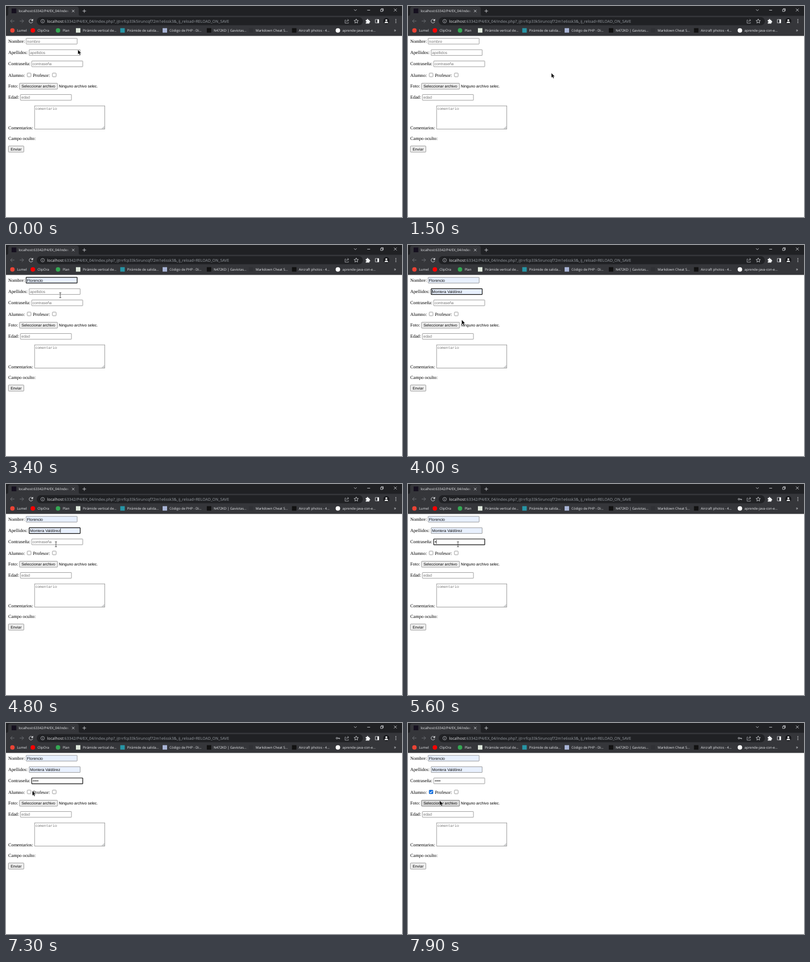
Recreate the animation shown at these times as an HTML page. Size 708x378 px, loop 8 s.

```html
<!DOCTYPE html>
<html lang="es">
<head>
<meta charset="utf-8">
<title>Formulario</title>
<style>
  html, body { margin: 0; width: 100%; height: 100%; overflow: hidden; background: #fff; }
  svg { display: block; text-rendering: geometricPrecision; white-space: pre; }
  .ui { font: 6.06px "Open Sans", sans-serif; fill: #e8eaed; }
  .url { font: 6.98px "Open Sans", sans-serif; fill: #9aa0a6; }
  .label { font: 8.29px "Liberation Serif", serif; fill: #000; }
  .control { font: 6.9px "Liberation Sans", sans-serif; fill: #000; }
  .hint { fill: #757575; }
  .mono { font: 6.45px "Liberation Mono", monospace; fill: #757575; }
  .icon { fill: none; stroke: #dfe1e5; stroke-width: .8; }
  .dim { stroke: #797c80; }
  .soft { stroke: #b4b7bb; }
  .solid { fill: #f1f3f4; stroke: none; }
  .box { fill: #fff; stroke: #767676; stroke-width: .7; }
  .button { fill: #efefef; stroke: #767676; stroke-width: .7; }
  .button.hover { fill: #dcdcdc; stroke: #4f4f4f; }
  .auto { fill: #e8f0fe; }
  .focus { stroke: #101010; stroke-width: 1.2; }
</style>
</head>
<body>
<svg id="stage" width="708" height="378" viewBox="0 0 708 378"></svg>
<script>
const LOOP = 8000, STEP = 100;
const stage = document.getElementById('stage');

function add(tag, attrs, content = '', parent = stage) {
  const el = document.createElementNS('http://www.w3.org/2000/svg', tag);
  for (const key in attrs) el.setAttribute(key, attrs[key]);
  el.textContent = content;
  return parent.appendChild(el);
}
const text = (cls, x, y, content) => add('text', { class: cls, x, y }, content);
const rect = (cls, x, y, width, height, rx = 0) => add('rect', { class: cls, x, y, width, height, rx });
const fillRect = (fill, x, y, width, height, rx = 0) => add('rect', { fill, x, y, width, height, rx });
const dot = (fill, cx, cy, r) => add('circle', { fill, cx, cy, r });
const path = (cls, d) => add('path', { class: cls, d });
const show = (el, on) => el.setAttribute('visibility', on ? 'visible' : 'hidden');

// Tab strip and toolbar
fillRect('#202124', 0, 0, 708, 20);
fillRect('#35363a', 0, 17.5, 708, 36.1);
path('tab', 'M0 18Q4 18 4 14V5Q4 1 8 1H126Q130 1 130 5V14Q130 18 134 18Z').setAttribute('fill', '#35363a');
fillRect('#16101f', 10, 4.5, 8.5, 8.5);
text('ui', 22.4, 11.3, 'localhost:63342/P4/EX_04/index.');
const fade = add('linearGradient', { id: 'fade' });
add('stop', { offset: 0, 'stop-color': '#35363a', 'stop-opacity': 0 }, '', fade);
add('stop', { offset: 1, 'stop-color': '#35363a' }, '', fade);
fillRect('url(#fade)', 106, 3, 8, 12);
fillRect('#35363a', 114, 3, 15, 12);
path('icon', 'M118 6.8l4.4 4.4m0-4.4l-4.4 4.4M140 5.8v6.4m-3.2-3.2h6.4');
path('icon', 'M622.3 6.2l2.3 2.3 2.3-2.3M645.8 7.5h5.2M693.6 4.7l5 5m0-5l-5 5');
path('icon', 'M669.8 6h3.6v3.8h-3.6zM671 6v-1.2h3.6v3.8h-1.2');
path('icon dim', 'M15 27H8m3.3-3.3L8 27l3.3 3.3M24.5 27h7m-3.3-3.3l3.3 3.3-3.3 3.3');
path('icon', 'M47.2 25.1A3.3 3.3 0 1 0 47.8 28');
path('solid', 'M48.4 23v3.6h-3.6z');
fillRect('#202124', 55, 20, 583, 14.5, 7.25);
path('icon soft', 'M68.7 27.2a3.2 3.2 0 1 0-6.4 0a3.2 3.2 0 1 0 6.4 0M65.5 26.8v2.2M65.5 25.1v.8');
const url = text('url', 73.5, 29.8, '');
add('tspan', { fill: '#e8eaed' }, 'localhost', url);
add('tspan', {}, ':63342/P4/EX_04/index.php?_ijt=rfcp33k5iruncqf72m1e6ssk3&_ij_reload=RELOAD_ON_SAVE', url);
const key = path('icon', 'M593 27.2a1.4 1.4 0 1 0-2.8 0a1.4 1.4 0 1 0 2.8 0H596.6v1.6m-1.6-1.6v1.4');
path('icon soft', 'M607.8 25.2h-1.6v5.6h6v-1.6M608.4 28.4q.3-2.8 3.6-2.8m-1.4-2l2.3 2-2.3 2');
path('icon', 'M626.2 23.2l1.1 2.6 2.8.3-2.1 1.8.6 2.7-2.4-1.4-2.4 1.4.6-2.7-2.1-1.8 2.8-.3z');
path('solid', 'M643.2 25h2v-.5a1.2 1.2 0 0 1 2.4 0v.5h2v2h.4a1.2 1.2 0 0 1 0 2.4h-.4v2h-6.4v-2h.4a1 1 0 0 0 0-2h-.4z');
path('icon', 'M660.3 24.2h6.2v6h-6.2z');
path('solid', 'M664 24h2.8v6.5H664z');
dot('#17181b', 680, 27, 5.4);
dot('#f1f3f4', 680, 25.4, 1.7);
path('solid', 'M676.8 30.4q0-2.6 3.2-2.6t3.2 2.6z');
for (const y of [24.2, 27, 29.8]) dot('#e8eaed', 697, y, .8);

// Bookmarks: icon centre, colour, round or square, title
[
  [11.5, '#ea4335', true, 'Lumel'],
  [48, '#f00', true, 'ClipOra'],
  [93, '#34a853', true, 'Plan'],
  [129, '#dfe8dc', false, 'Pirámide vertical de...'],
  [208.3, '#2795a5', false, 'Pirámide de salida...'],
  [284, '#a9b5d6', false, 'Código de PHP - Di...'],
  [363, '#111', false, 'N472KD | Gaviotas...'],
  [438, '#303135', false, 'Markdown Cheat S...'],
  [515.3, '#111', false, 'Aircraft photos - 4...'],
  [593.4, '#fff', true, 'aprende-java-con-e...'],
].forEach(([x, color, round, title]) => {
  round ? dot(color, x, 43.7, 4) : fillRect(color, x - 4, 39.7, 8, 8);
  text('ui', x + 8.2, 46, title);
});
text('ui', 693.5, 45.8, '»').style.fontSize = '8px';

// Form
[
  [65.6, 'Nombre:'], [86, 'Apellidos:'], [106.2, 'Contraseña:'], [126.6, 'Alumno:'],
  [146, 'Foto:'], [166.2, 'Edad:'], [220.6, 'Comentarios:'], [239.6, 'Campo oculto:'],
].forEach(([y, label]) => text('label', 4, y, label));
text('label', 48.2, 126.6, 'Profesor:');

function field(x, y, hint) {
  const box = rect('box', x, y, 91.2, 10.3, .6);
  const value = text('control hint', x + 1.6, y + 7.6, hint);
  const caret = fillRect('#000', 0, y + 1.5, .7, 7.3);
  const dots = [0, 1, 2, 3].map(i => dot('#000', x + 3.2 + i * 2.55, y + 5.1, .95));
  return function set({ content = '', auto = false, focus = false, blink = false, caretAtStart = false, count = 0 }) {
    box.setAttribute('class', 'box' + (auto ? ' auto' : '') + (focus ? ' focus' : ''));
    value.setAttribute('class', content ? 'control' : 'control hint');
    value.textContent = count ? '' : content || hint;
    dots.forEach((d, i) => show(d, i < count));
    const advance = count ? count * 2.55 : content && !caretAtStart ? value.getComputedTextLength() : 0;
    caret.setAttribute('x', x + 1.7 + advance);
    show(caret, focus && !blink);
  };
}
const setName = field(36, 57.9, 'nombre');
const setSurname = field(41.4, 78.3, 'apellidos');
const setPassword = field(46, 98.5, 'contraseña');
field(25.8, 158.6, 'edad')({});

rect('box', 38, 120.2, 6.6, 6.6, 1);
rect('box', 83, 120.2, 6.6, 6.6, 1);
const check = add('g', {});
add('rect', { fill: '#0b6be0', x: 37.7, y: 119.9, width: 7.2, height: 7.2, rx: 1 }, '', check);
add('path', { fill: 'none', stroke: '#fff', 'stroke-width': 1.1, d: 'M39.2 123.6l1.5 1.5 2.8-3.2' }, '', check);

const fileButton = rect('button', 24.1, 138.4, 68, 10.6, 1);
text('control', 27.7, 146.2, 'Seleccionar archivo');
text('control', 94.5, 146.2, 'Ninguno archivo selec.');
rect('box', 51.1, 179, 125.6, 41.6);
text('mono', 52.4, 186.4, 'comentario');
path('icon dim', 'M171.8 219.8l4-4M174 219.8l1.8-1.8');
rect('button', 4.3, 250.8, 27.6, 11, 1);
text('control', 8.2, 258.7, 'Enviar');

// Mouse pointer: time, x, y
const track = [
  [0, 128.5, 78.2], [100, 152, 100], [200, 204, 137], [300, 240, 128], [400, 256.3, 120],
  [1500, 256.3, 120], [1600, 236, 106], [1800, 158, 70], [2000, 112, 64],
  [2400, 112, 64], [2600, 116.3, 82], [2800, 116.3, 83], [3400, 97, 90],
  [3700, 97, 90], [4000, 96, 134], [4300, 96, 134], [4700, 89.3, 108],
  [6600, 89.3, 108], [7400, 41, 123.5], [7600, 41, 123.5], [7900, 56.6, 139], [8000, 56.6, 139],
];
const beamSpans = [[1900, 2500], [2700, 3800], [4600, 6900]];
const arrow = add('path', { fill: '#000', stroke: '#fff', 'stroke-width': .4, d: 'M0 0V8.6L2 6.8 3.3 9.8 4.8 9.1 3.5 6.2H6.1Z' });
const beam = add('path', { fill: 'none', stroke: '#333', 'stroke-width': .8, d: 'M-1.8-4.4H1.8M-1.8 4.4H1.8M0-4.4V4.4' });

function pointerAt(t) {
  const i = track.findIndex(point => point[0] > t);
  const [t0, x0, y0] = track[i - 1], [t1, x1, y1] = track[i];
  const k = (t - t0) / (t1 - t0);
  return [x0 + (x1 - x0) * k, y0 + (y1 - y0) * k];
}
const during = (t, from, to) => t >= from && t < to;

function draw(now) {
  const t = Math.floor(now % LOOP / STEP) * STEP;
  setName({
    content: t >= 2600 ? 'Florencio' : '', auto: t >= 2600,
    focus: during(t, 2100, 3500), caretAtStart: t < 2700, blink: t >= 3200,
  });
  setSurname({
    content: t >= 3900 ? 'Montera Valdórez' : '', auto: t >= 3900,
    focus: during(t, 3500, 4900), caretAtStart: t < 4100,
  });
  setPassword({
    count: [5600, 5800, 6000, 6400].filter(press => t >= press).length,
    focus: during(t, 4900, 7600), blink: during(t, 5400, 5600) || during(t, 6900, 7400),
  });
  show(key, t >= 5600);
  show(check, t >= 7600);
  fileButton.classList.toggle('hover', t >= 7900);

  const isBeam = beamSpans.some(span => during(t, ...span));
  show(beam, isBeam);
  show(arrow, !isBeam);
  (isBeam ? beam : arrow).setAttribute('transform', `translate(${pointerAt(t)})`);
}
function tick() {
  draw(performance.now());
  requestAnimationFrame(tick);
}
tick();
</script>
</body>
</html>
```
